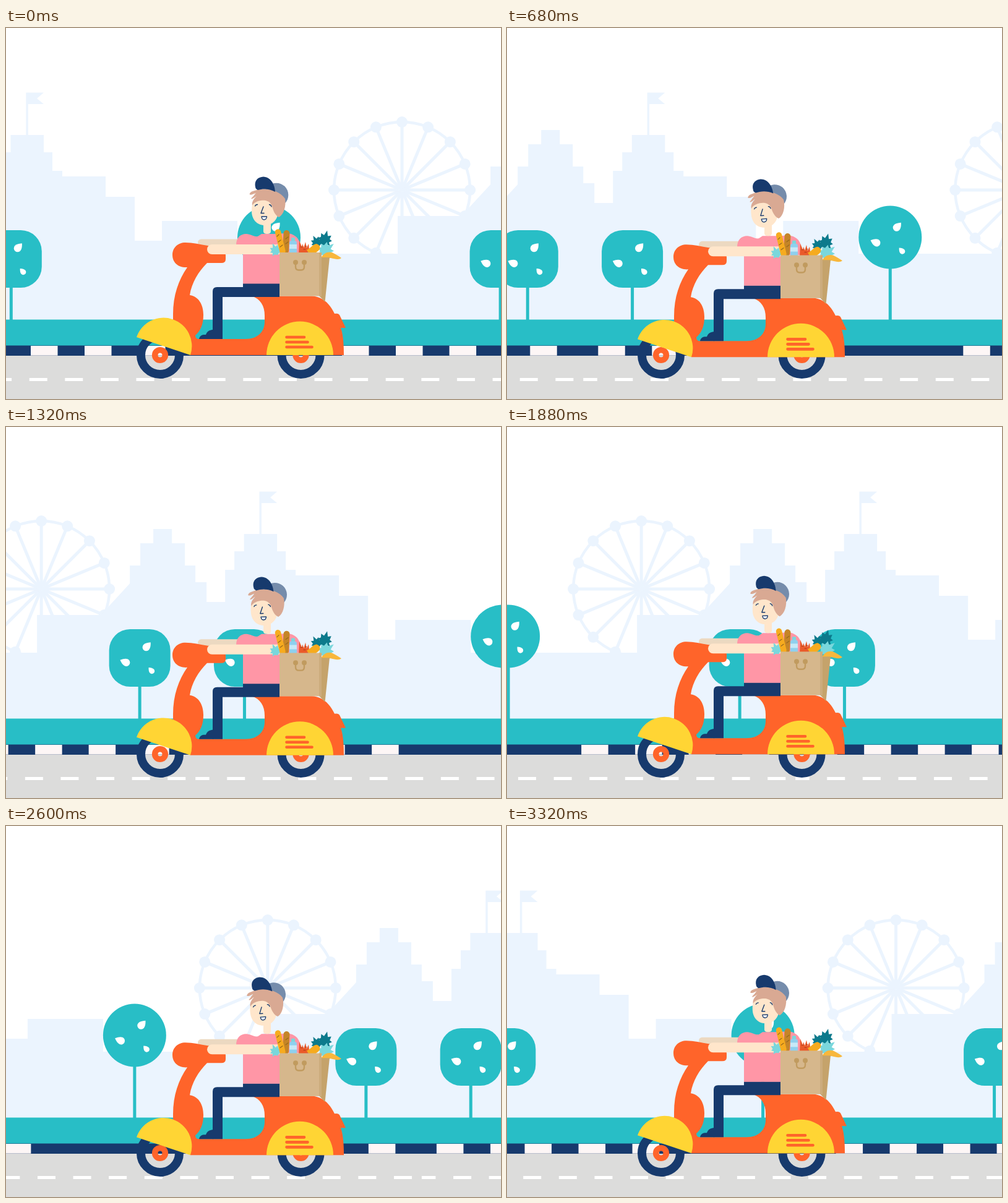
Recreate the animation shown at these times as an HTML page. Size 800 by 600 pixels, loop 3360 ms.

```html
<!DOCTYPE html>
<html lang="en">
<head>
<meta charset="utf-8">
<title>Scooter delivery</title>
<style>
html, body { margin: 0; width: 100%; height: 100%; overflow: hidden; background: #fff; }
svg { display: block; width: 800px; height: 600px; }
</style>
</head>
<body>
<svg id="stage" viewBox="0 0 800 600" xmlns="http://www.w3.org/2000/svg"></svg>
<script>
const LOOP = 3360, STEP = 40, TILE = 960, BOB = 480;
const C = {
  city: '#ebf4fe', teal: '#28bec6', navy: '#173a6d', road: '#dcdcdb', curb: '#fdf6f6',
  orange: '#ff642a', yellow: '#ffd534', skin: '#ffe6cb', shade: '#ecd9c1', pink: '#ff96a6',
  hair: '#d9a993', cap: '#758cab', bag: '#d6b78c', side: '#c5a36b', string: '#c19b5f',
  leaf: '#0c7a8c', mint: '#7ad7dc', gold: '#f6ab1f', crust: '#c58527', carrot: '#ea5a2a'
};

const path = (d, fill) => `<path d="${d}" fill="${fill}"/>`;
const line = (d, color, w, cap = 'round') =>
  `<path d="${d}" fill="none" stroke="${color}" stroke-width="${w}" stroke-linecap="${cap}" stroke-linejoin="round"/>`;
const rect = (x, y, w, h, fill, r = 0) =>
  `<rect x="${x}" y="${y}" width="${w}" height="${h}" rx="${r}" fill="${fill}"/>`;
const disc = (x, y, r, fill) => `<circle cx="${x}" cy="${y}" r="${r}" fill="${fill}"/>`;
const ring = (x, y, r, w, color) =>
  `<circle cx="${x}" cy="${y}" r="${r}" fill="none" stroke="${color}" stroke-width="${w}"/>`;
const group = (id, body) => `<g id="${id}">${body}</g>`;
const place = (x, y, turn, size, body) =>
  `<g transform="translate(${x} ${y}) rotate(${turn}) scale(${size})">${body}</g>`;
const range = n => [...Array(n).keys()];

// Scenery
function ferris(x, y, r) {
  const nodes = range(16).map(i => {
    const a = i * Math.PI / 8;
    const px = x + r * Math.cos(a), py = y + r * Math.sin(a);
    return line(`M${x} ${y}L${px} ${py}`, C.city, 5) + disc(px, py, 9, C.city);
  });
  return ring(x, y, r, 4.5, C.city) + disc(x, y, 12, C.city) + nodes.join('');
}

const skyline = path('M-586 471V365H-327V304H-224L-177 253V224H-160V188H-139V165H-109V188' +
  'H-88V224H-71V251H-53V283H-23V231H-8V201H7.5V173H61V201H75V231H91V240H161V273' +
  'H208V344H252V312H374V365H378V471Z', C.city);
const flag = rect(32.3, 104.5, 3.5, 70, C.city) + path('M35 104.5H61L50 114L61 123H35Z', C.city);

const petal = (x, y, turn, size) => place(x, y, turn, size,
  path('M0 -9C4 -5 6.5 -1 6.5 2.5A6.5 6.5 0 0 1 -6.5 2.5C-6.5 -1 -4 -5 0 -9Z', '#fff'));
const petals = (x, y) => petal(x + 12, y, 42, .93) + petal(x - 24, y + 25.5, -68, .93) +
  petal(x + 18.5, y + 39, -42, .68);
const squareTree = x => rect(x - 2.5, 415, 5, 57, C.teal) +
  rect(x - 49.5, 327, 99, 93, C.teal, 34) + petals(x, 354.5);
const roundTree = x => rect(x - 2.5, 385, 5, 87, C.teal) +
  disc(x, 338.5, 51, C.teal) + petals(x, 321);

const blocks = [40, 127, 214, 543, 630, 716.5, 803, 913]
  .map(x => rect(x, 514, 43.5, 15.7, C.curb)).join('');
const dashes = range(17).map(i => {
  const x = -77.5 + 57.6 * i, cut = i ? 0 : 6.5;
  return rect(x + cut, 566, 29 - cut, 5, '#fff');
}).join('');

const tiled = (id, body) => {
  const copies = [-TILE, 0, TILE].map(x => `<g transform="translate(${x} 0)">${body}</g>`);
  return `<g class="scroll" id="${id}">${copies.join('')}</g>`;
};

// Scooter
const wheel = x => ring(x, 529, 31, 14, C.navy) + ring(x, 529, 8.3, 9.6, C.orange);

const frame = path('M290 347C302 347 314 350 326 352H345Q355 356 355 368V374Q355 380 348 380H325' +
  'C311 394 300 412 297 432C311 434 319 447 319 464C319 480 314 490 306 497Q306 503 312 503' +
  'H387C407 503 418 491 418 475V465C418 449 411 438 397 433.5H494C511 434 523 445 531 462' +
  'Q537 461 539 464L549 485H541Q546 498 546 529H298L270 480V463C270 432 279 407 293 387' +
  'C278 388 269 379 269 367C269 355 278 347 290 347Z', C.orange);
const fenders = path('M211 500A45.5 45.5 0 1 1 298 529Z', C.yellow) +
  path('M421 529A54 54.5 0 0 1 529 529Z', C.yellow) +
  line('M453.5 500H482M453.5 508H487.500M453.5 516H494.500', C.orange, 4.6);

// Rider
const backArm = rect(310, 341.500, 80, 11, C.shade, 5.5);
const legs = path('M383 413H442V435H350V503H334V426Q334 419 341 419H383Z', C.navy) +
  path('M312 503C313 497 318 495.500 323 496C325 490 330 488 335 488V503Z', C.navy);
const shirt = path('M372 351C372 339 379 333 388 333C395 333 400 338 407 337L413 333H434' +
  'C446 333 456 331 463 334C472 338 475 345 475 352V364H442V413.500H383V351Z', C.pink);
const neck = path('M416 308H428V329Q428 333 422 333Q416 333 416 329Z', C.skin);
const frontArm = path('M333 350H442V366H333A8 8 0 0 1 333 350Z', C.skin);

const head =
  disc(437, 270, 19.3, C.cap) +
  path('M397 296C397 278 404 271 420 271C434 272 440 283 440 296C440 309 431 319 418 319S397 309 397 296Z', C.skin) +
  path('M393.500 269C395 263 402 264 407 261C421 258 443 263 451 276C453 288 449 302 441 306' +
    'C435 303 432 296 430 288C427 280 420 278 412 279C405 280 400 283 398 287' +
    'C397 281 400 277 405 272C401 274 399 277 396 276C400 272 401 270 404 267C400 268 397 271 393.500 269Z', C.hair) +
  path('M403 257C401 248 406 241 416 240.500C427 241 434 251 435 265C425 259 414 260 407 262Q403 260 403 257Z', C.navy) +
  line('M402.500 288Q403.500 285.500 406.500 285.500M425.500 285.500Q428.500 286 429 289', C.navy, 1.3) +
  line('M416 289L412 299.500H417', C.navy, 1.4) +
  `<path d="M413 305H421.500Q421 310 417 310Q413.500 310 413 305Z" fill="#fff" stroke="${C.navy}" stroke-width="1.3" stroke-linejoin="round"/>`;

// Shopping
const sprig = (x, y, turn, size, color) => place(x, y, turn, size,
  path('M0 0L-5 -3L-10 -2L-7 -7L-11 -10L-7 -12L-8 -18L-3 -16L0 -24L3 -16L8 -18L7 -12L11 -10L7 -7L10 -2L5 -3Z', color));
const carrots = [[474, 344, 478], [479, 349, 481], [484, 346, 483], [489, 349, 486]]
  .map(([x, y, base]) => path(`M${x} ${y}L${base + 5} 366H${base - 5}Z`, C.carrot)).join('');

const food =
  sprig(439, 367, -24, .85, C.mint) +
  line('M453.500 332L452 360', C.crust, 10) +
  line('M439.500 330L447 361', C.gold, 9.5) +
  line('M441 334L438 337M444 343L440 346M447 351L443 354M456 338L452 341M456 346L452 349', '#9a6a1d', 1.3) +
  rect(461, 339, 6, 6, C.mint, 1) + rect(458, 344, 12, 22, '#8fd0ee', 4) + rect(458, 350, 12, 7, '#c7e9f7') +
  carrots + line('M476 354H479M481 358H484M484 353H486', '#a83b1c', 1) +
  sprig(506, 354, -28, .85, C.leaf) + sprig(513, 352, 14, 1.05, C.leaf) +
  sprig(508, 366, 52, 1.15, C.mint) + sprig(513, 366, 18, .8, C.mint) +
  disc(491, 364, 4, '#a4568f') +
  path('M486 359C493 356 495 350 502 349C508 351 509 356 505 360L500 364H489Z', C.gold) +
  path('M509 372C513 364 520 361 527 363C533 366 538 369 542 372C539 375 532 374 525 372Z', '#f8b73c');

const bag =
  path('M506 371H523L515.500 443L506 433Z', C.side) + rect(442, 363, 68, 70.500, C.bag) +
  path('M506 363H510V433.500H506Z', '#ccac7d') +
  disc(468, 379, 4, C.string) + disc(482, 379, 4, C.string) +
  line('M468 380V386Q468 391.500 473 391.500H477Q482 391.500 482 386V380', C.string, 2.4);

const stage = document.getElementById('stage');
stage.innerHTML =
  tiled('town', skyline + flag + ferris(640, 262, 110)) +
  tiled('trees', squareTree(8.3) + squareTree(799) + roundTree(425)) +
  rect(0, 471.500, 800, 43, C.teal) +
  rect(0, 513.500, 800, 17, C.navy) + tiled('kerb', blocks) +
  rect(0, 530, 800, 70, C.road) + tiled('lane', dashes) +
  wheel(249) + wheel(476.500) +
  group('ride', backArm + frame + fenders + legs + shirt + neck +
    group('head', head) + frontArm + group('load', food + bag));

const ride = document.getElementById('ride');
const headPart = document.getElementById('head');
const load = document.getElementById('load');
const scrolls = document.querySelectorAll('.scroll');
const start = performance.now();

function draw(now) {
  const t = Math.floor(Math.max(0, now - start) % LOOP / STEP) * STEP;
  const bob = (1 - Math.cos(2 * Math.PI * t / BOB)) / 2;
  const shift = TILE * t / LOOP;
  scrolls.forEach(s => s.setAttribute('transform', `translate(${shift} 0)`));
  ride.setAttribute('transform', `translate(0 ${3.6 * bob})`);
  headPart.setAttribute('transform', `rotate(${-4.4 * bob} 422 330)`);
  // The load squashes a little towards the seat.
  load.setAttribute('transform', `translate(0 434) scale(1 ${1 - .017 * bob}) translate(0 -434)`);
  requestAnimationFrame(draw);
}
draw(start);
</script>
</body>
</html>
```
